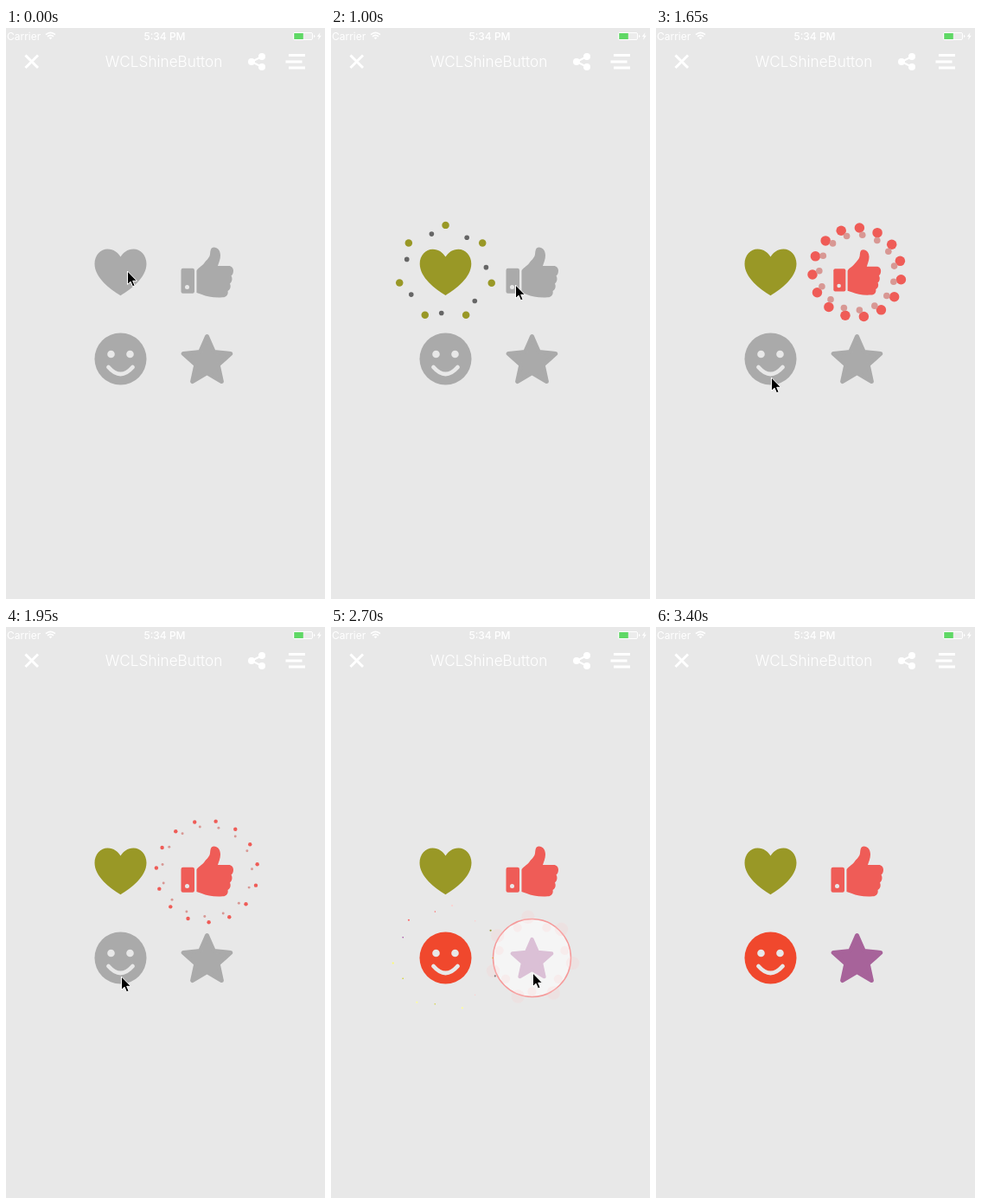
An HTML page for the animation above (3730 ms loop, 369 px wide and 660 px high).

```html
<!DOCTYPE html>
<html lang="en">
<head>
<meta charset="utf-8">
<title>Shine buttons</title>
<style>
  html, body { margin: 0; width: 100%; height: 100%; overflow: hidden; background: #e8e8e8; }
  svg { display: block; width: 369px; height: 660px; }
  text { font-family: Inter, "Liberation Sans", sans-serif; fill: #fff; }
</style>
</head>
<body>
<svg id="stage" viewBox="0 0 369 660" xmlns="http://www.w3.org/2000/svg">
  <rect width="369" height="660" fill="#e8e8e8"/>

  <text x="1" y="13.5" font-size="12">Carrier</text>
  <text x="183.5" y="13.5" font-size="12" font-weight="500" text-anchor="middle">5:34 PM</text>
  <text x="182.5" y="45" font-size="17.2" font-weight="300" text-anchor="middle">WCLShineButton</text>

  <g fill="none" stroke="#fff" stroke-width="1.6">
    <path d="M46 7.6Q51.5 3 57 7.6M48 9.8Q51.5 7 55 9.8"/>
    <path d="M51.5 13.2L49.6 11.2Q51.5 9.8 53.4 11.2Z" fill="#fff" stroke="none"/>
  </g>

  <rect x="332.5" y="5.5" width="22" height="8" rx="1.5" fill="#ececec" stroke="#fff"/>
  <rect x="333.3" y="6" width="10.5" height="7" fill="#5fd865"/>
  <path d="M356 8v3q1.4-.4 1.4-1.5T356 8Z" fill="#fff"/>
  <path d="M363.5 5L359.8 10H362L361 14L364.8 8.8H362.5Z" fill="#fff"/>

  <g fill="none" stroke="#fff" stroke-width="3">
    <path d="M22.5 31.5L37 46M37 31.5L22.5 46"/>
    <path d="M296 33L284 39L296 45" stroke-width="2"/>
    <path d="M327 31.5H346M323.5 39H342.5M327 46H346"/>
  </g>
  <g fill="#fff">
    <circle cx="284" cy="39" r="4"/><circle cx="296" cy="33" r="4"/><circle cx="296" cy="45" r="4"/>
  </g>

  <g id="buttons"></g>
  <path id="cursor" d="M0 0V15.5L3.6 12.2L6 17.8L8.6 16.7L6.2 11.3H11Z" fill="#000" stroke="#fff" stroke-width="1"/>
</svg>
<script>
const LOOP = 3730, FIRST = 540, STEP = 58.5, LAST = 49;
const GRAY = '#aaaaaa';
const PALETTE = ['#ffff99', '#ffcccc', '#993399', '#ff6666', '#ffff66',
                 '#f44336', '#666666', '#cccc00', '#666666', '#999933'];

const starPoints = Array.from({ length: 10 }, (_, i) => {
  const r = i % 2 ? 13.4 : 28.7, a = i * Math.PI / 5;
  return (r * Math.sin(a)).toFixed(2) + ',' + (2.8 - r * Math.cos(a)).toFixed(2);
}).join(' ');

const ICONS = {
  heart: '<path d="M0 26.7C-12 19.5-30 6-30-10C-30-20-23-27-15-27C-8-27-3-23 0-18C3-23 8-27 15-27C23-27 30-20 30-10C30 6 12 19.5 0 26.7Z"/>',
  like: '<rect x="-30" y="-4.7" width="15.5" height="29" rx="2.2"/>' +
    '<circle cx="-23" cy="17" r="2.5" fill="#e8e8e8"/>' +
    '<path d="M-12-2C-11-5-6-7-3-11C0-15 3-17 3.5-21C4-25 4-29 8-29C12.5-29 15.5-25 15.5-19.5C15.5-15 13.5-11 12.5-7.5L25-7.5C28.5-7.5 30.5-5 30.5-2C30.5 1 29.5 3 28 4C29.5 6 29.5 11 26.5 13C28 16 27 20 24 21.5C25 26 22 28.5 18 28.8C8 29.5 0 28-6 25.5L-12 23.5Z"/>',
  smile: '<circle r="30"/><g fill="#e8e8e8"><circle cx="-11" cy="-5.5" r="4.3"/><circle cx="11" cy="-5.5" r="4.3"/></g>' +
    '<path d="M-14 9.5Q0 25.5 14 9.5" fill="none" stroke="#e8e8e8" stroke-width="4.8" stroke-linecap="round"/>',
  star: `<polygon points="${starPoints}" stroke="currentColor" stroke-width="5" stroke-linejoin="round"/>`
};

// click: ring starts growing; grow: its duration; burst: dots fly and the icon pops
const BUTTONS = [
  { icon: 'heart', x: 132.5, y: 282.5, fill: '#999826', big: '#999826', small: '#666666',
    count: 7, lag: 20, click: 486, grow: 150, burst: 686 },
  { icon: 'like', x: 232.5, y: 282.5, fill: '#ef5c57', big: '#ef5c57', small: '#d89894',
    count: 15, lag: -5, click: 1342, grow: 100, burst: 1442 },
  { icon: 'smile', x: 132.5, y: 382.5, fill: '#f0482d', big: '#ff6666', small: '#ff6666',
    count: 7, lag: 20, click: 1972, grow: 100, burst: 2072,
    mixBig: [1, 9, 6, 0, 0, 4, 3], mixSmall: [3, 1, 7, 1, 7, 7, 2] },
  { icon: 'star', x: 232.5, y: 382.5, fill: '#a7639a', big: '#ff6666', small: '#ff6666',
    count: 7, lag: 20, click: 2530, grow: 100, burst: 2630, flash: true }
];

// time, x, y of the pointer tip
const POINTER = [[0, 140.5, 281], [700, 140.5, 281], [990, 213.5, 297], [1380, 213.5, 297],
  [1645, 133.5, 404], [1990, 133.5, 404], [2230, 233.5, 400], [2850, 233.5, 400], [3190, 297, 470]];

const clamp = v => Math.max(0, Math.min(1, v));
const smooth = v => { v = clamp(v); return v * v * (3 - 2 * v); };

function bezier(x1, y1, x2, y2) {
  const at = (a, b, s) => 3 * (1 - s) * (1 - s) * s * a + 3 * (1 - s) * s * s * b + s * s * s;
  return x => {
    let lo = 0, hi = 1;
    for (let i = 0; i < 24; i++) {
      const mid = (lo + hi) / 2;
      if (at(x1, x2, mid) < x) lo = mid; else hi = mid;
    }
    return at(y1, y2, lo);
  };
}
const easeOut = bezier(0, 0, 0.58, 1);
const easeInOut = bezier(0.42, 0, 0.58, 1);

// smooth curve through the pop scales
function popScale(p) {
  const v = [0.4, 0.4, 1, 0.9, 1, 1];
  const s = clamp(p) * 3, i = Math.min(2, Math.floor(s)), u = s - i;
  const [a, b, c, d] = v.slice(i, i + 4);
  return 0.5 * (2 * b + (c - a) * u + (2 * a - 5 * b + 4 * c - d) * u * u + (3 * b - a - 3 * c + d) * u * u * u);
}

function make(tag, parent) {
  return parent.appendChild(document.createElementNS('http://www.w3.org/2000/svg', tag));
}
function set(el, attrs) {
  for (const k in attrs) el.setAttribute(k, attrs[k]);
}

const layer = document.getElementById('buttons');
const cursor = document.getElementById('cursor');

for (const b of BUTTONS) {
  b.shape = make('g', layer);
  b.shape.innerHTML = ICONS[b.icon];
}
for (const b of BUTTONS) {
  const g = make('g', layer);
  set(g, { transform: `translate(${b.x} ${b.y})` });
  b.ring = make('circle', g);
  set(b.ring, { fill: '#fff', 'stroke-width': 1.5 });
  b.dots = make('g', g);
  b.bigs = Array.from({ length: b.count }, () => make('circle', b.dots));
  b.smalls = Array.from({ length: b.count }, () => make('circle', b.dots));
}

function flashColor(seed, age) {
  const n = Math.floor(age / 115);
  if (n < 1) return PALETTE[1];
  const r = Math.sin(seed * 12.9898 + n * 78.233) * 43758.5453;
  return PALETTE[Math.floor((r - Math.floor(r)) * PALETTE.length)];
}

function placeDot(el, deg, dist, r, fill) {
  const a = deg * Math.PI / 180;
  set(el, { cx: dist * Math.sin(a), cy: -dist * Math.cos(a), r, fill });
}

function drawButton(b, t, over) {
  const age = t - b.burst, on = age >= 0;
  const color = on ? b.fill : GRAY;
  const scale = on ? popScale(age / 333) : 1;
  set(b.shape, { fill: color, color, transform: `translate(${b.x} ${b.y}) scale(${scale})` });

  const alpha = t < b.click ? 0 : 1 - clamp(age / 185);
  set(b.ring, {
    r: 1 + 44 * easeInOut(clamp((t - b.click) / b.grow)),
    stroke: b.flash && !on ? flashColor(5, t - b.click + 115) : b.big,
    opacity: alpha
  });

  const p = age / 870;
  const live = on && p < 1 && !over;
  b.dots.style.display = live ? '' : 'none';
  if (!live) return;
  set(b.dots, { opacity: smooth((age - 30) / 150) });
  const e = easeOut(p), gap = 360 / b.count;
  for (let i = 0; i < b.count; i++) {
    const deg = gap * (i - 1 / b.count) + 20 * p;
    const pick = (mix, base, seed) =>
      b.flash ? flashColor(seed, age) : mix ? PALETTE[mix[i]] : base;
    placeDot(b.bigs[i], deg, 45 + 18 * e, 9 - 8.9 * e, pick(b.mixBig, b.big, i + 1));
    placeDot(b.smalls[i], deg - b.lag, 36 + 21.06 * e, 5.94 - 5.84 * e, pick(b.mixSmall, b.small, i + 31));
  }
}

function drawCursor(t) {
  let i = 0;
  while (i < POINTER.length - 2 && t >= POINTER[i + 1][0]) i++;
  const [t0, x0, y0] = POINTER[i], [t1, x1, y1] = POINTER[i + 1];
  const e = smooth((t - t0) / (t1 - t0));
  set(cursor, { transform: `translate(${x0 + (x1 - x0) * e} ${y0 + (y1 - y0) * e})` });
  cursor.style.display = t < 3200 ? '' : 'none';
}

// the screen refreshes in even steps, resting before the first and after the last
function draw(ms) {
  const k = Math.min(LAST, Math.floor((ms - FIRST + 9) / STEP));
  const t = k < 0 ? 0 : FIRST + k * STEP;
  for (const b of BUTTONS) drawButton(b, t, k === LAST);
  drawCursor(t);
}

const start = performance.now();
function tick() {
  draw((performance.now() - start) % LOOP);
  requestAnimationFrame(tick);
}
tick();
</script>
</body>
</html>
```
